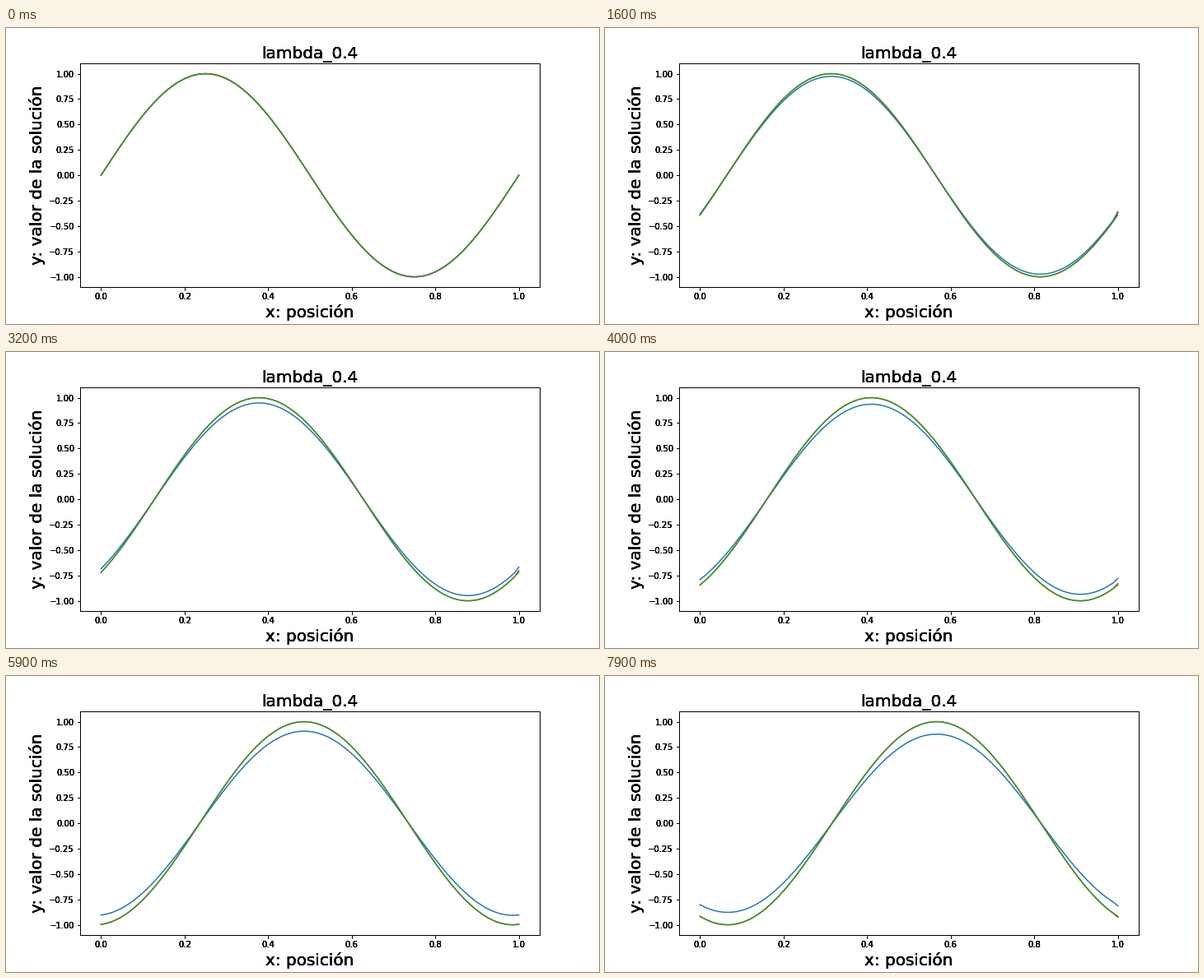
Recreate the animation shown at these times as a matplotlib script. Size 720 by 360 pixels, loop 8000 ms.

```python
import numpy as np
import matplotlib.pyplot as plt
from matplotlib.animation import FuncAnimation

STEPS, INTERVAL = 80, 100
DX, CFL = 0.01, 0.4
K = 2 * np.pi
COPIES = 5  # stacked layers give the heavy, hard-edged lettering

# Amplification factors per time step for the mode sin(2*pi*x)
theta = K * DX
LAX_FRIEDRICHS = np.cos(theta) - 1j * CFL * np.sin(theta)
LAX_WENDROFF = 1 - 1j * CFL * np.sin(theta) - CFL**2 * (1 - np.cos(theta))
EXACT = np.exp(-1j * CFL * theta)

x = np.linspace(0, 1, 101)


def wave(g, n, pos):
    return np.imag(g**n * np.exp(1j * K * pos))


def numeric(g, n):
    """Scheme solution; the right end copies the left end one step late."""
    u = wave(g, n, x)
    u[-1] = wave(g, max(n - 1, 0), 0.0)
    return u


def add_layer(fig):
    ax = fig.add_axes([0.125, 0.125, 0.775, 0.755], label=f"layer{len(fig.axes)}")
    ax.patch.set_visible(False)
    ax.set_xlim(-0.05, 1.05)
    ax.set_ylim(-1.1, 1.1)
    ax.set_xticks(np.linspace(0, 1, 6))
    ax.set_yticks(np.linspace(-1, 1, 9))
    ax.set_title("lambda_0.4", fontsize=20)
    ax.set_xlabel("x: posición", fontsize=20)
    ax.set_ylabel("y: valor de la solución", fontsize=20)
    return ax


plt.rcParams.update({"font.family": "DejaVu Sans", "font.size": 10})
fig = plt.figure(figsize=(10, 5), dpi=72, facecolor="white")
for _ in range(COPIES):
    ax = add_layer(fig)

blue, red, green = (
    ax.plot(x, np.sin(K * x), color=c, lw=1.5)[0]
    for c in ("tab:blue", "tab:red", "tab:green")
)


def update(n):
    blue.set_ydata(numeric(LAX_FRIEDRICHS, n))
    red.set_ydata(numeric(LAX_WENDROFF, n))
    green.set_ydata(wave(EXACT, n, x))
    return blue, red, green


anim = FuncAnimation(fig, update, frames=STEPS, interval=INTERVAL,
                     repeat=True, repeat_delay=0, blit=False)
plt.show()
```
